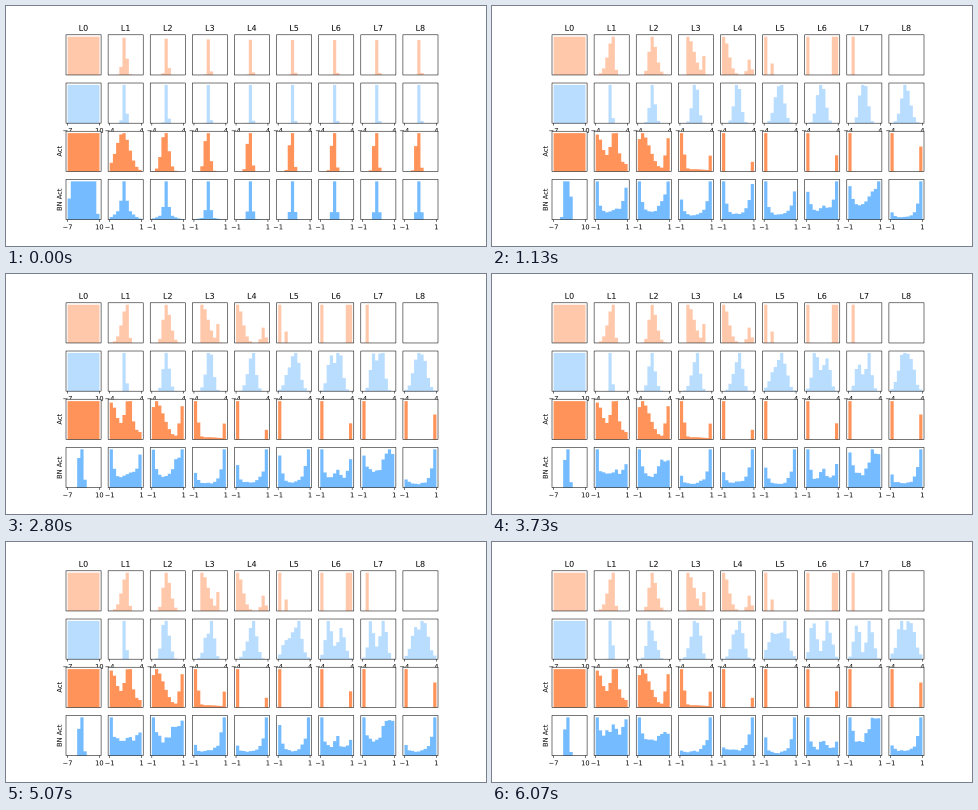
Recreate the animation shown at these times as a matplotlib script. Size 480x240 px, loop 6.39 s.

```python
import numpy as np
import matplotlib.pyplot as plt
from matplotlib.animation import FuncAnimation
from matplotlib.patches import PathPatch, Rectangle
from matplotlib.textpath import TextPath
from matplotlib.transforms import Affine2D

plt.rcParams["path.snap"] = False      # soft, sub-pixel edges

W, H, DPI = 480, 240, 48
LOOP, INTERVAL, STATES, STATE_MS = 6390, 30, 12, 533
LAYERS = 9
PRE, BN_PRE, ACT, BN_ACT = range(4)
STYLES = [("#FF9359", 0.5), ("#74BCFF", 0.5), ("#FF9359", 1), ("#74BCFF", 1)]
CELL_W, CELL_H = 0.775 * W / 10.6, 0.77 * H / 4.6
PT = DPI / 72
BINS = np.arange(10)
rng = np.random.default_rng(3)

# Trained layers without normalisation: bumps as (mid, left, right, height)
PRE_BUMPS = {
    1: [(5, 1.6, 0.5, 1)],
    2: [(3.9, 0.9, 1.4, 1)],
    3: [(2, 0.3, 2, 1), (7, 0.3, 0.3, 0.45)],
    4: [(0, 1, 1.6, 1), (8, 0.6, 0.7, 0.4)],
    5: [(0, 0.3, 0.3, 1), (2, 0.3, 0.3, 0.3)],
    6: [(0, 0.3, 0.3, 1), (8.5, 0.4, 0.4, 2.2)],
    7: [(1, 0.3, 0.3, 1)],
    8: [],
}
ACT_BUMPS = {
    1: [(0, 1, 1.8, 0.9), (5.6, 1.4, 1, 1), (8.5, 1, 1, 0.2)],
    2: [(0.6, 1, 2.7, 1), (9, 0.8, 1, 0.85)],
    3: [(0, 1, 0.75, 1), (9, 0.3, 1, 0.4), (4, 4, 4, 0.06)],
}
ACT_RIGHT = {4: 0.25, 6: 0.42, 8: 0.65}

# Normalised pre-activations split in two: (low mid, high mid, width, low weight)
SPLIT = {1: (4.3, 4.3, 0.4, 1), 2: (3.3, 4.9, 0.9, 2), 3: (3, 5, 1, 0.4),
         4: (3, 5.2, 1.1, 0.45), 5: (2, 5.8, 1.4, 0.6), 6: (1.9, 6.4, 1.1, 1.1),
         7: (2.2, 6.4, 1, 0.9), 8: (2.9, 6.2, 1.5, 1.1)}

# Normalised outputs, early and late: (left edge, right edge, floor)
CUPS = {1: ((0.9, 0.9, 0.1), (0.55, 0.25, 0.45)),
        2: ((0.9, 0.9, 0.1), (0.6, 0.3, 0.4)),
        3: ((0.55, 0.9, 0.1), (0.05, 0.9, 0.1)),
        4: ((0.9, 0.6, 0.1), (0.05, 0.9, 0.12)),
        5: ((0.9, 0.5, 0.12), (0.4, 0.9, 0.08)),
        6: ((0.4, 0.8, 0.2), (0.85, 0.25, 0.2)),
        7: ((0.4, 0.4, 0.3), (0.4, 0.1, 0.3)),
        8: ((0.1, 1, 0.04), (0.2, 0.9, 0.13))}
# Inner bumps that grow on top: (mid, width, height)
INNER = {1: (5.3, 1, 0.15), 2: (7, 1, 0.35), 6: (4.8, 0.8, 0.3),
         7: (7.4, 1.2, 0.6)}


def bump(mid, left, right, height=1):
    d = BINS - mid
    return height * np.exp(-0.5 * (d / np.where(d < 0, left, right)) ** 2)


def total(bumps):
    return sum((bump(*b) for b in bumps), np.zeros(10))


def ripple(amount):
    return 1 + amount * rng.uniform(-1, 1, 10)


def spike(layer, mid, width, spread):
    """Initial peak, narrower in deeper layers."""
    w = width + spread * np.exp(1 - layer)
    return bump(mid, w, w)


def pre(layer, s):
    return spike(layer, 4.15, 0.35, 0.3) if s == 0 else total(PRE_BUMPS[layer])


def act(layer, s):
    if s == 0:
        return spike(layer, 3.65, 0.6, 1.5)
    edges = [(0, 0.3, 0.3, 1), (9, 0.3, 0.3, ACT_RIGHT.get(layer, 0))]
    return total(ACT_BUMPS.get(layer, edges))


def bn_pre(layer, s):
    if s == 0:
        return spike(layer, 4.15, 0.35, 0.15)
    low, high, width, weight = SPLIT[layer]
    p = (s / (STATES - 1)) ** 0.6
    mid = 4.25
    w = width * (0.75 + 0.25 * p)
    pair = (bump(mid + (low - mid) * p, w, w, weight)
            + bump(mid + (high - mid) * p, w, w))
    return pair * ripple(0.2 * p)


def bn_act(layer, s):
    if s == 0:
        return (spike(layer, 4, 0.55, 0.1)
                + bump(4, 2.3, 2.3, 0.45 * np.exp(1 - layer)))
    p = ((s - 1) / (STATES - 2)) ** 0.6
    early, late = np.array(CUPS[layer])
    left, right, floor = early + (late - early) * p
    cup = left * np.exp(-BINS / 0.8) + right * np.exp((BINS - 9) / 1.1) + floor
    if layer in INNER:
        mid, width, height = INNER[layer]
        cup += bump(mid, width, width, height * (0.3 + 0.7 * p))
    return cup * ripple(0.05 + 0.15 * p)


def input_spread(s):
    """Uniform input squeezed by the running statistics."""
    mid = 4.2 + 0.6 / (1 + s) ** 2
    half = 0.85 + 3.5 / (1 + s) ** 1.8
    return np.clip(np.minimum(mid + half, BINS + 1) - np.maximum(mid - half, BINS),
                   0, 1)


def heights(row, layer, s):
    if layer == 0:
        return input_spread(s) if row == BN_ACT else np.ones(10)
    bars = (pre, bn_pre, act, bn_act)[row](layer, s)
    return np.minimum(bars / max(bars.max(), 1e-9), 1) if row != PRE \
        else np.minimum(bars, 1)


fig = plt.figure(figsize=(W / DPI, H / DPI), dpi=DPI, facecolor="white")
ax = fig.add_axes([0, 0, 1, 1])
ax.set(xlim=(0, W), ylim=(0, H))
ax.autoscale(False)
ax.axis("off")


def label(text, x, y, size, z, turn=0):
    """Text centred on x (or on y when turned), standing on its baseline."""
    path = TextPath((0, 0), text, size=size * PT)
    box = path.get_extents()
    place = Affine2D().translate(-(box.x0 + box.x1) / 2, 0)
    place.rotate_deg(turn).translate(x, y)
    ax.add_patch(PathPatch(place.transform_path(path), fc="black", lw=0, zorder=z))


def draw_cell(row, col, x, y):
    z = 10 * row
    ax.add_patch(Rectangle((x, y), CELL_W, CELL_H, fc="white", ec="none", zorder=z))
    ax.add_patch(Rectangle((x, y), CELL_W, CELL_H, fill=False, ec="black",
                           lw=0.8, zorder=z + 3))
    if row == PRE:
        label(f"L{col}", x + CELL_W / 2, y + CELL_H + 6 * PT, 12, z + 4)
    if row in (BN_PRE, BN_ACT):
        limit = 4 if row == BN_PRE else 1
        ends = (-7, 10) if col == 0 else (-limit, limit)
        for value, share in zip(ends, (1 / 22, 21 / 22)):
            tx = x + CELL_W * share
            ax.plot([tx, tx], [y, y - 3.5 * PT], color="black", lw=0.8,
                    solid_capstyle="butt", zorder=z + 2)
            label(str(value).replace("-", "\u2212"), tx, y - 14.6 * PT, 10, z + 2)
    if col == 0 and row in (ACT, BN_ACT):
        label("Act" if row == ACT else "BN Act", x - 6.4 * PT, y + CELL_H / 2,
              10, z + 4, turn=90)


def make_panel(row, col):
    x = 0.125 * W + 1.2 * CELL_W * col
    y = 0.88 * H - CELL_H * (1 + 1.2 * row)
    draw_cell(row, col, x, y)
    levels = [y + heights(row, col, s) * CELL_H / 1.05 for s in range(STATES)]
    color, alpha = STYLES[row]
    patch = ax.stairs(levels[0], x + CELL_W * np.linspace(1, 21, 11) / 22,
                      baseline=y, fill=True, facecolor=color, alpha=alpha,
                      zorder=10 * row + 1)
    return patch, levels


panels = [make_panel(row, col) for row in range(4) for col in range(LAYERS)]


def update(i):
    state = min((i * INTERVAL + INTERVAL - 1) // STATE_MS, STATES - 1)
    for patch, levels in panels:
        patch.set_data(levels[state])
    return [patch for patch, _ in panels]


anim = FuncAnimation(fig, update, frames=LOOP // INTERVAL, interval=INTERVAL,
                     repeat=True, repeat_delay=0, blit=False)
plt.show()
```
